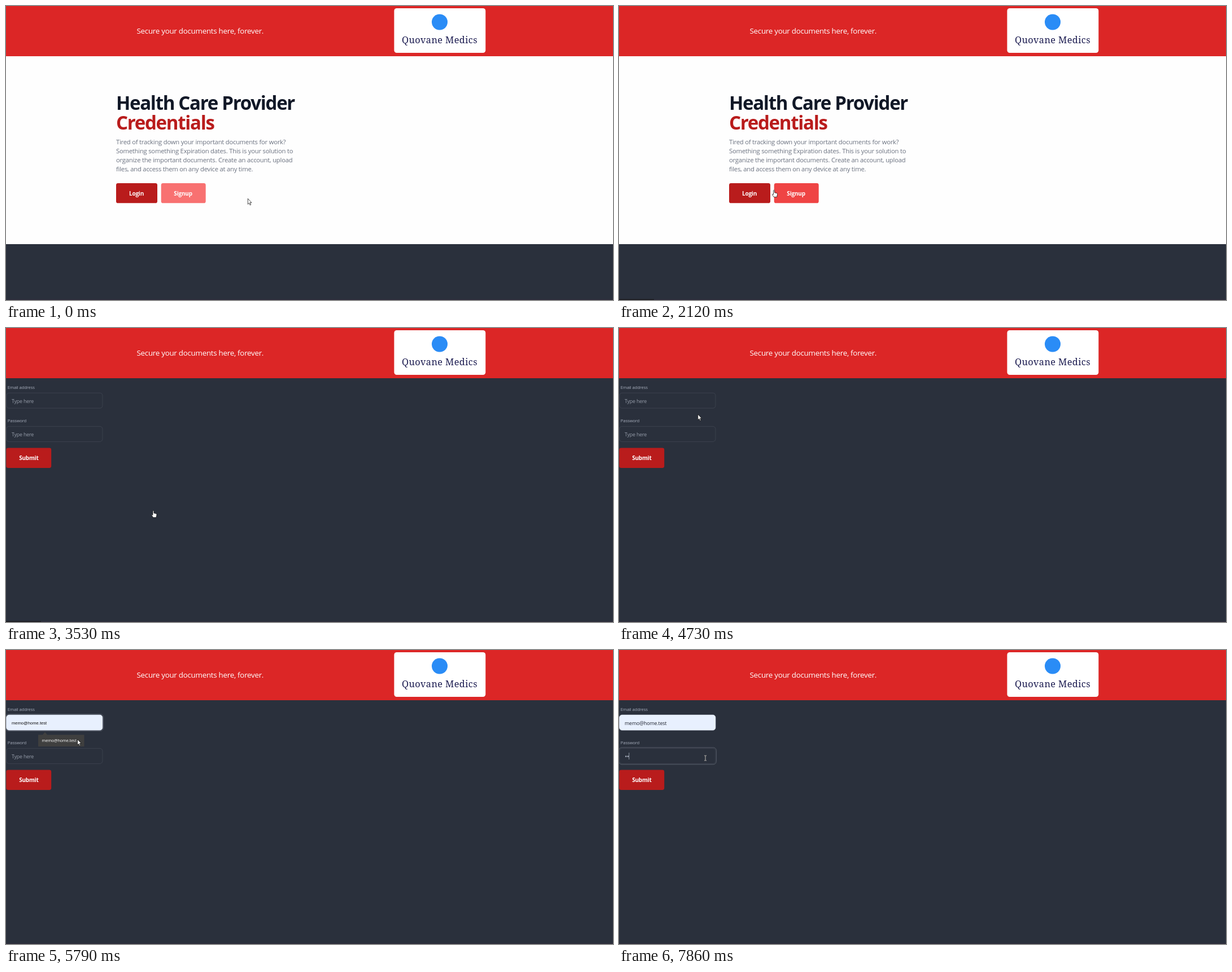
These frames come from a looping animation (1075 by 521 pixels, 8000 ms). An HTML page:

```html
<!DOCTYPE html>
<html lang="en">
<head>
<meta charset="utf-8">
<title>Sign-in walkthrough</title>
<style>
html, body { margin: 0; width: 100%; height: 100%; overflow: hidden; background: #2a303c; }
svg { display: block; width: 1075px; height: 521px; }
text { font-family: "Open Sans", "Noto Sans", sans-serif; letter-spacing: -.02em; fill: #a6adbb; white-space: pre; }
.title { font-size: 33.1px; font-weight: 700; letter-spacing: -.04em; }
.body text { font-size: 11.25px; fill: #6b7280; }
.btn { font-size: 10px; font-weight: 700; fill: #fff; text-anchor: middle; }
.label { font-size: 7.7px; }
.value { font-size: 8.9px; }
.hint { font-size: 8.9px; fill: #959ca9; }
.preview { font: 7.6px "Liberation Sans", Arial, sans-serif; letter-spacing: 0; fill: #111; }
.brand { font: 16.3px "Noto Serif", serif; letter-spacing: .4px; fill: #1b1b50; text-anchor: middle; }
.field { fill: #2a303c; stroke: #a6adbb; stroke-opacity: .2; stroke-width: .7; }
.ring { fill: none; stroke: #555b67; stroke-width: 1; }
.pointer { fill: #fff; stroke: #000; stroke-width: .7; stroke-linejoin: round; }
#beam { fill: none; stroke: #fff; stroke-width: .9; mix-blend-mode: difference; }
</style>
</head>
<body>
<svg viewBox="0 0 1075 521">
  <rect width="1075" height="521" fill="#2a303c"/>
  <rect width="1075" height="89" fill="#dc2626"/>
  <text x="231.5" y="49.3" style="font-size:13.37px;fill:#fff">Secure your documents here, forever.</text>
  <rect x="687.4" y="4" width="161.9" height="79" rx="4.6" fill="#fff"/>
  <circle cx="768" cy="28.5" r="14" fill="#2a8cf6"/>
  <text class="brand" x="768" y="66">Quovane Medics</text>

  <g id="home">
    <rect y="89" width="1075" height="333" fill="#fefefe"/>
    <text class="title" x="195" y="184" style="fill:#111827">Health Care Provider</text>
    <text class="title" x="195" y="218.5" style="fill:#b91c1c">Credentials</text>
    <g class="body">
      <text x="195" y="244.6">Tired of tracking down your important documents for work?</text>
      <text x="195" y="260.6">Something something Expiration dates. This is your solution to</text>
      <text x="195" y="276.7">organize the important documents. Create an account, upload</text>
      <text x="195" y="292.7">files, and access them on any device at any time.</text>
    </g>
    <rect id="login" x="195" y="314" width="73" height="35.3" rx="3.4"/>
    <text class="btn" x="231" y="335.6">Login</text>
    <rect id="signup" x="274.7" y="314" width="79" height="35.3" rx="3.4"/>
    <text class="btn" x="313.6" y="335.6">Signup</text>
  </g>

  <g id="form">
    <text class="label" x="2.8" y="107.6">Email address</text>
    <rect id="email" class="field" x=".7" y="115.1" width="170.2" height="27" rx="4.6"/>
    <text id="emailHint" class="hint" x="10" y="132.6">Type here</text>
    <text id="emailPreview" class="preview" x="10" y="132.4">memo@home.test</text>
    <text id="emailValue" class="value" x="10" y="132.6" style="fill:#1f2430">memo@home.test</text>
    <rect id="emailRing" class="ring" x="-.6" y="113.5" width="173" height="30" rx="5.6"/>
    <text class="label" x="2.8" y="166.6">Password</text>
    <rect class="field" x=".7" y="174.4" width="170.2" height="27" rx="4.6"/>
    <text id="passHint" class="hint" x="10" y="191.8">Type here</text>
    <circle id="dot1" cx="12.3" cy="188.6" r="1.3" fill="#a6adbb"/>
    <circle id="dot2" cx="15.9" cy="188.6" r="1.3" fill="#a6adbb"/>
    <rect id="passRing" class="ring" x="-.6" y="172.8" width="173" height="30" rx="5.6"/>
    <rect x=".4" y="212.6" width="79.8" height="35.3" rx="3.4" fill="#b91c1c"/>
    <text class="btn" x="40.4" y="234.4">Submit</text>
    <rect id="caret" width=".8" height="12"/>
    <g id="menu">
      <path id="menuBox" d="M57 150.3H65L69 145.5L73 150.3H138.5V171H57Z"/>
      <text x="63.6" y="163.2" style="font-size:7.3px;fill:#fff">memo@home.test</text>
    </g>
  </g>

  <rect y="520" width="1075" height="1" fill="#2f2a3a"/>
  <rect id="status" y="519.4" width="62" height="1.6" fill="#1b1b1f"/>
  <circle id="click" r="6.8" fill="#ff0" opacity=".4"/>
  <path id="arrow" class="pointer" d="M.3.3V10.3L2.5 8.2L4.2 11.9L5.7 11.2L4.1 7.6H7Z"/>
  <path id="hand" class="pointer" d="M-1 .2Q0-1 1 .2V4L5 5.1Q6.3 5.5 6 7L5 11.8H-.4L-3.2 7.6Q-3.2 6-1 7.4Z"/>
  <path id="beam" d="M-2-4.4H-.7L0-3.8L.7-4.4H2M0-3.8V3.8M-2 4.4H-.7L0 3.8L.7 4.4H2"/>
</svg>
<script>
const LOOP = 8000;
const $ = id => document.getElementById(id);
const show = (id, on) => { $(id).style.display = on ? '' : 'none'; };

// Pointer route: time, x, y
const route = [
  [790, 428, 341], [1250, 396.7, 338], [1590, 347, 333], [2000, 290, 328], [2180, 267, 326],
  [2450, 262, 324.5], [2520, 261, 324], [3940, 261, 324], [4250, 232, 280], [4500, 180, 205],
  [4730, 139.5, 152.7], [4820, 137, 147], [5000, 130, 132], [5400, 128, 131], [5600, 128, 150],
  [5790, 126.3, 158], [6190, 126.3, 158], [6310, 127, 164], [6730, 131, 188], [7000, 131, 188],
  [7190, 153, 191.5]
];

function pointerAt(t) {
  const next = route.findIndex(p => p[0] > t);
  if (next < 0) return route[route.length - 1].slice(1);
  if (next === 0) return route[0].slice(1);
  const [t0, x0, y0] = route[next - 1], [t1, x1, y1] = route[next];
  const k = (t - t0) / (t1 - t0);
  return [x0 + (x1 - x0) * k, y0 + (y1 - y0) * k];
}

function draw(t) {
  const within = (a, b) => t >= a && t < b;
  const [x, y] = pointerAt(t);
  const home = t < 3530;
  const onLogin = home && x < 268, onSignup = home && x > 274 && x < 353;
  const preview = within(5600, 6190), filled = t >= 6190, emailFocus = within(5060, 6870);

  show('home', home);
  show('form', !home);
  $('login').setAttribute('fill', onLogin ? '#991b1b' : '#b91c1c');
  $('signup').setAttribute('fill', onSignup ? '#ef4444' : '#f87171');
  show('status', within(1660, 3800));

  // An autofilled field is light right up to its edge
  $('email').style.fill = $('email').style.stroke = preview || filled ? '#e8f0fe' : '';
  $('email').style.strokeOpacity = preview || filled ? 1 : '';
  show('emailHint', t < 5600);
  show('emailPreview', preview);
  show('emailValue', filled);
  show('emailRing', emailFocus);
  show('menu', within(5190, 6190));
  $('menuBox').setAttribute('fill', preview ? '#3f3f3f' : '#303030');

  const dots = (t >= 7720) + (t >= 7860);
  show('passHint', !dots);
  show('dot1', dots > 0);
  show('dot2', dots > 1);
  show('passRing', t >= 6870);

  const caret = $('caret');
  caret.setAttribute('x', emailFocus ? (filled ? 85 : 10) : 10 + dots * 3.7);
  caret.setAttribute('y', emailFocus ? 123 : 182);
  caret.setAttribute('fill', filled && emailFocus ? '#1f2430' : '#a6adbb');
  show('caret', within(5060, 5600) || within(6190, 6690) || within(6870, 7390) || dots);

  const inField = !home && x < 171 && (y > 115 && y < 142 || y > 174 && y < 202);
  const shape = onLogin || onSignup || within(3530, 4010) ? 'hand' : inField ? 'beam' : 'arrow';
  for (const id of ['arrow', 'hand', 'beam', 'click']) {
    show(id, id === shape);
    $(id).setAttribute('transform', `translate(${x} ${y})`);
  }
  show('click', within(3140, 3330) || within(5000, 5120) || within(6100, 6190) || within(6800, 6870));
}

function tick() {
  draw(performance.now() % LOOP);
  requestAnimationFrame(tick);
}
tick();
</script>
</body>
</html>
```
